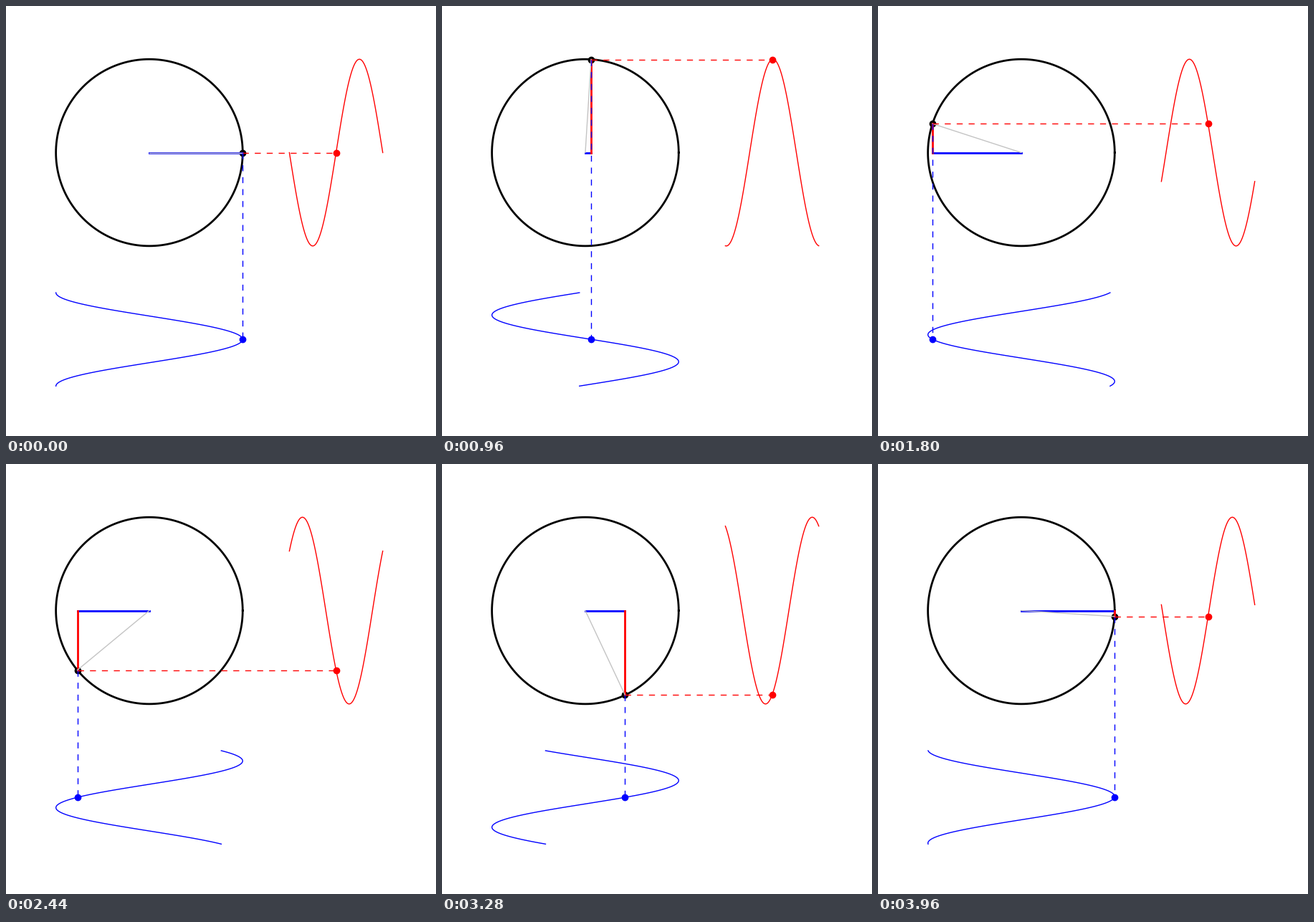
A matplotlib script for the animation above (4 s loop, 600 by 600 pixels).

```python
import numpy as np
import matplotlib.pyplot as plt
from matplotlib.animation import FuncAnimation

SIZE, DPI = 600, 100
FRAMES, INTERVAL = 100, 40
CX, CY, R = 199.95, 204.55, 130.3

fig = plt.figure(figsize=(SIZE / DPI, SIZE / DPI), dpi=DPI, facecolor="white")
ax = fig.add_axes([0, 0, 1, 1])
ax.set_xlim(0, SIZE)
ax.set_ylim(SIZE, 0)
ax.axis("off")


def to_px(x, y):
    """Map unit-circle coordinates to stage pixels."""
    return CX + R * np.asarray(x), CY - R * np.asarray(y)


def line(color, lw=1, **style):
    return ax.plot([], [], color=color, lw=lw, **style)[0]


def dot(color):
    return line(color, marker="o", ms=6, mew=1, mec=color, ls="none")


def place(artist, x, y):
    artist.set_data(*to_px(x, y))


# Artists are stacked in the order they are made.
ring = line("k", lw=2)
turn = np.linspace(0, 2 * np.pi, 201)
place(ring, np.cos(turn), np.sin(turn))

rim_dot = dot("k")
cos_leg = line("b", lw=2)
sin_leg = line("r", lw=2)
radius = line("0.77")
sin_guide = line("r", dashes=(6, 6))
cos_guide = line("b", dashes=(6, 6))
sin_wave = line("r")
cos_wave = line("b")
sin_dot = dot("r")
cos_dot = dot("b")

span = np.linspace(-0.5, 0.5, 101)


def update(i):
    a = 2 * np.pi * i / FRAMES
    c, s = np.cos(a), np.sin(a)
    phase = a + 2 * np.pi * span

    place(rim_dot, [c], [s])
    place(cos_leg, [0, c], [0, 0])
    place(sin_leg, [c, c], [0, s])
    place(radius, [0, c], [0, s])
    place(sin_guide, [c, 2], [s, s])
    place(cos_guide, [c, c], [s, -2])
    place(sin_wave, 2 + span, np.sin(phase))
    place(cos_wave, np.cos(phase), -2 + span)
    place(sin_dot, [2], [s])
    place(cos_dot, [c], [-2])
    return (rim_dot, cos_leg, sin_leg, radius, sin_guide, cos_guide,
            sin_wave, cos_wave, sin_dot, cos_dot)


anim = FuncAnimation(fig, update, frames=FRAMES, interval=INTERVAL,
                     init_func=lambda: update(0), repeat=True, repeat_delay=0)
plt.show()
```
